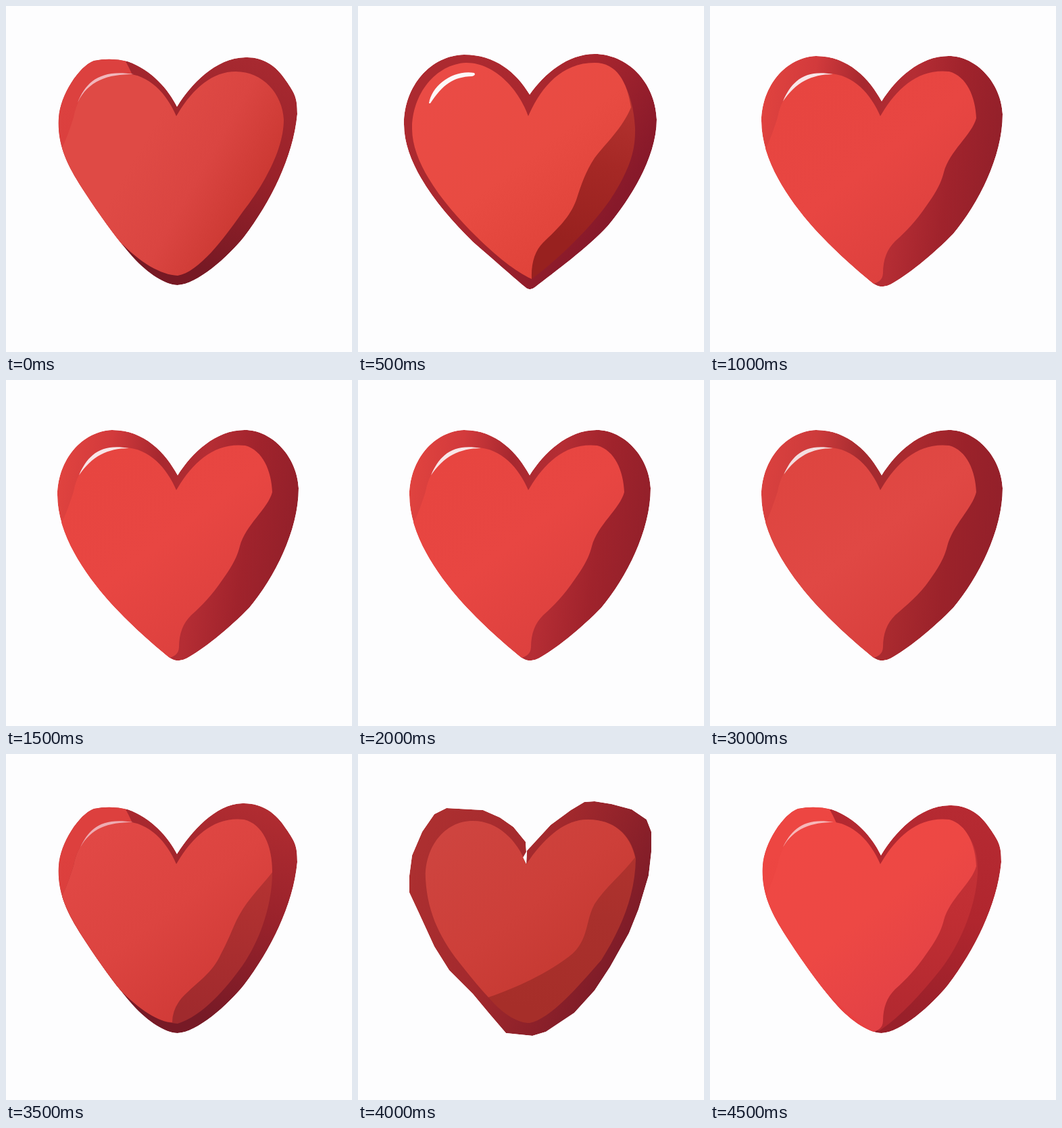
Recreate the animation shown at these times as an HTML page. Size 512x512 px, loop 5 s.

```html
<!DOCTYPE html>
<html lang="en">
<head>
<meta charset="utf-8">
<title>Heart</title>
<style>
html, body { margin: 0; width: 100%; height: 100%; overflow: hidden; background: #fdfdfe; }
svg { display: block; width: 100%; height: 100%; }
</style>
</head>
<body>
<svg id="stage" viewBox="0 0 512 512"></svg>
<script>
const STEP = 500;

// Outlines
const smooth = 'M254 141C236 108 205 74 157 74C112 76 77 118 76 170C76 225 112 282 155 330C190 368 225 397 242 411Q254 419 267 412C290 400 330 368 360 337C395 295 433 225 433 160C431 115 395 74 353 74C310 74 275 108 254 141Z';
const wide = 'M254 131C234 98 203 72 157 72C108 73 68 118 68 175C68 235 120 300 170 349C200 375 235 406 250 418Q256 421 262 416C290 394 340 358 370 325C405 283 442 222 442 168C440 112 398 71 350 71C310 71 276 100 254 131Z';
const tilted = (notch, top, topX) => `M253 ${notch}C240 123 216 95 180 82Q155 76 130 81C108 89 80 132 78 165C75 212 96 245 126 290C145 318 168 350 188 372C210 396 236 413 254 413C282 412 328 372 352 342C390 292 425 225 431 160C431 136 428 130 414 110C400 88 380 ${top} ${topX} ${top}C310 ${top - 1} 272 118 253 ${notch}Z`;
const rough = 'M245 152L249 145L248 130L230 108L210 94L185 83L131 80L113 89L95 115L80 150L76 180L76 205L90 235L113 285L135 320L170 355L195 385L219 413L258 417L278 411L320 383L350 350L373 315L401 265L415 230L430 180L434 145L434 115L427 97L405 82L375 74L350 70L335 71L315 83L285 105L262 130L250 143L249 163L244 153Z';

// Front faces
const lobe = 'M252 163C238 130 212 101 176 100C140 98 108 122 100 165C92 190 86 205 80 215';
const lit = bend => `${lobe}C95 280 165 355 242 411Q256 407 256 395C256 375 262 360 274 348C290 334 ${305 + bend} 318 ${320 + bend} 296C${335 + bend} 275 ${342 + bend} 262 ${346 + bend} 246C${354 + bend} 215 388 190 394 166C393 135 380 104 354 97C308 92 276 122 252 163Z`;
const leftEdge = lobe + 'C95 265 135 318 168 348C198 380 230 398 ';
const whole = leftEdge + '254 399C285 394 322 345 350 305C385 260 411 210 411 168C409 130 380 97 340 97C305 97 276 122 252 163Z';
const softFace = leftEdge + '246 397Q246 378 260 361C285 335 305 325 318 296C332 270 337 252 346 237C358 215 380 193 394 175C394 135 380 104 352 97C308 92 276 122 252 163Z';
const softBody = leftEdge + '254 399C290 388 325 348 350 313C378 272 394 220 394 175C394 135 380 104 352 97C308 92 276 122 252 163Z';
const wideLeft = 'M252 163C240 128 205 84 160 84C115 86 80 130 80 182C80 235 130 297 175 341C205 371 235 394 257 404';
const wideBody = wideLeft + 'C300 372 345 327 373 287C402 242 411 215 410 180C407 125 385 84 350 84C300 84 270 122 252 163Z';
const wideFace = wideLeft + 'C256 380 262 362 274 350C295 330 314 312 323 287C331 262 337 245 350 225C365 205 392 180 404 150C398 112 383 84 350 84C300 84 270 122 252 163Z';
const roughLeft = 'M249 163C236 128 207 99 170 99C125 99 98 142 100 185C103 237 123 276 155 315Q177 343 193 360';
const roughBody = roughLeft + 'C217 388 238 398 254 398C285 392 325 345 360 305C385 265 410 215 411 155C404 118 378 97 340 97C305 97 275 125 249 163Z';
const roughFace = roughLeft + 'C250 340 290 318 318 295C341 273 337 246 350 222C366 197 391 178 410 153C402 118 378 97 340 97C305 97 275 125 249 163Z';

// Bright left side of the rim
const side = (x, y) => `M170 70Q180 86 187 102L252 300L${x} ${y}L${x - 22} ${y + 60}L0 420L0 0Z`;
const shine = (x, y, tip, depth) => `M${x} ${y}C${x + 12} 112 140 93 ${tip} 101C150 101 ${x + 12 + depth} ${106 + depth} ${x} ${y}Z`;

const fade = (box, ...colors) => ({ box, colors });
const across = [76, 150, 433, 200], down = [370, 80, 300, 390], diag = [130, 120, 320, 370];

const dull = {
  outline: tilted(149, 76, 357),
  layers: [
    [fade(down, '#a72930', '#9a222a', '#771924')],
    [fade(diag, '#dc413f', '#d43636'), side(174, 350)],
    [fade([210, 190, 375, 285], '#df4a45', '#da4541', '#cb3832'), whole],
    ['#f1b7bc', shine(106, 143, 189, 4)]
  ]
};
const bold = {
  outline: wide,
  layers: [
    [fade([150, 100, 400, 270], '#ac2a30', '#a8262e', '#87192a')],
    [fade([390, 120, 320, 350], '#b63431', '#a52825', '#98211f'), wideBody],
    [fade(diag, '#ea4b45', '#e84b42', '#df4239'), wideFace],
    ['#fdf8f8', 'M105 144C109 118 140 94 172 99Q175 102 169 104C140 105 126 116 107 144Z']
  ]
};
const glossy = (bend, glint, rim, face) => ({
  outline: smooth,
  layers: [
    [fade(across, ...rim)],
    [fade(diag, ...face), lit(bend)],
    [glint, shine(108 + bend / 4, 141 - bend / 4, 182, 7)]
  ]
});
const vivid = glossy(0, '#f8e6e8', ['#e0433f', '#d23a3c', '#a7282f', '#b52d34', '#a0232c', '#93202a'], ['#e74540', '#e84642', '#dc403e']);
const calm = glossy(5, '#f3dedf', ['#da413f', '#cd3b3b', '#a32a2f', '#aa2a2f', '#9b222a', '#93202a'], ['#de4540', '#e04844', '#d83f3d']);
const soft = {
  outline: tilted(148, 73, 352),
  layers: [
    [fade(down, '#b02c31', '#99222b', '#771a26')],
    [fade(diag, '#dd403e', '#d23636'), side(166, 342)],
    [fade(down, '#bd3735', '#ae3030', '#a02a2d'), softBody],
    [fade(diag, '#e14845', '#dc4440', '#cf3936'), softFace],
    ['#eeacb2', shine(110, 138, 188, 4)]
  ]
};
const carved = {
  outline: rough,
  layers: [
    [fade([90, 150, 380, 300], '#ac2f30', '#a3292d', '#7f1c28')],
    [fade(down, '#b3342f', '#a9302c', '#a62e29'), roughBody],
    [fade(diag, '#ce443f', '#cd3f39', '#c33730'), roughFace]
  ]
};
const bright = {
  outline: tilted(150, 76, 357),
  layers: [
    [fade(down, '#b62a32', '#b0262e', '#99202a')],
    [fade(diag, '#ed4642', '#e83f40'), side(242, 411)],
    [fade(down, '#c63439', '#c02e33', '#b32930'), 'M252 163L340 97C378 104 398 130 396 178C393 225 372 278 342 318C310 358 280 390 250 410L230 400Z'],
    [fade(diag, '#ef4844', '#ed4844', '#e24146'), lit(0)],
    ['#f7b8b9', shine(108, 138, 183, 4)]
  ]
};

const poses = [dull, bold, vivid, calm, soft, carved, bright];
const sequence = [dull, bold, vivid, vivid, vivid, calm, calm, soft, carved, bright];

const stage = document.getElementById('stage');
let gradients = 0;

function paint(fill) {
  if (typeof fill === 'string') return { fill, defs: '' };
  const id = 'tone' + gradients++;
  const [x1, y1, x2, y2] = fill.box;
  const stops = fill.colors.map((c, i) =>
    `<stop offset="${i / (fill.colors.length - 1)}" stop-color="${c}"/>`).join('');
  return {
    fill: `url(#${id})`,
    defs: `<linearGradient id="${id}" gradientUnits="userSpaceOnUse" x1="${x1}" y1="${y1}" x2="${x2}" y2="${y2}">${stops}</linearGradient>`
  };
}

function draw(pose, index) {
  const shapes = pose.layers.map(([tone, path = pose.outline]) => {
    const { fill, defs } = paint(tone);
    return `${defs}<path d="${path}" fill="${fill}"/>`;
  }).join('');
  return `<g visibility="hidden"><clipPath id="edge${index}"><path d="${pose.outline}"/></clipPath>` +
    `<g clip-path="url(#edge${index})">${shapes}</g></g>`;
}

stage.innerHTML = poses.map(draw).join('');
const groups = [...stage.children];
const start = performance.now();

function tick() {
  const step = Math.floor((performance.now() - start) / STEP) % sequence.length;
  const current = poses.indexOf(sequence[step]);
  groups.forEach((g, i) => g.setAttribute('visibility', i === current ? 'visible' : 'hidden'));
  requestAnimationFrame(tick);
}
tick();
</script>
</body>
</html>
```
